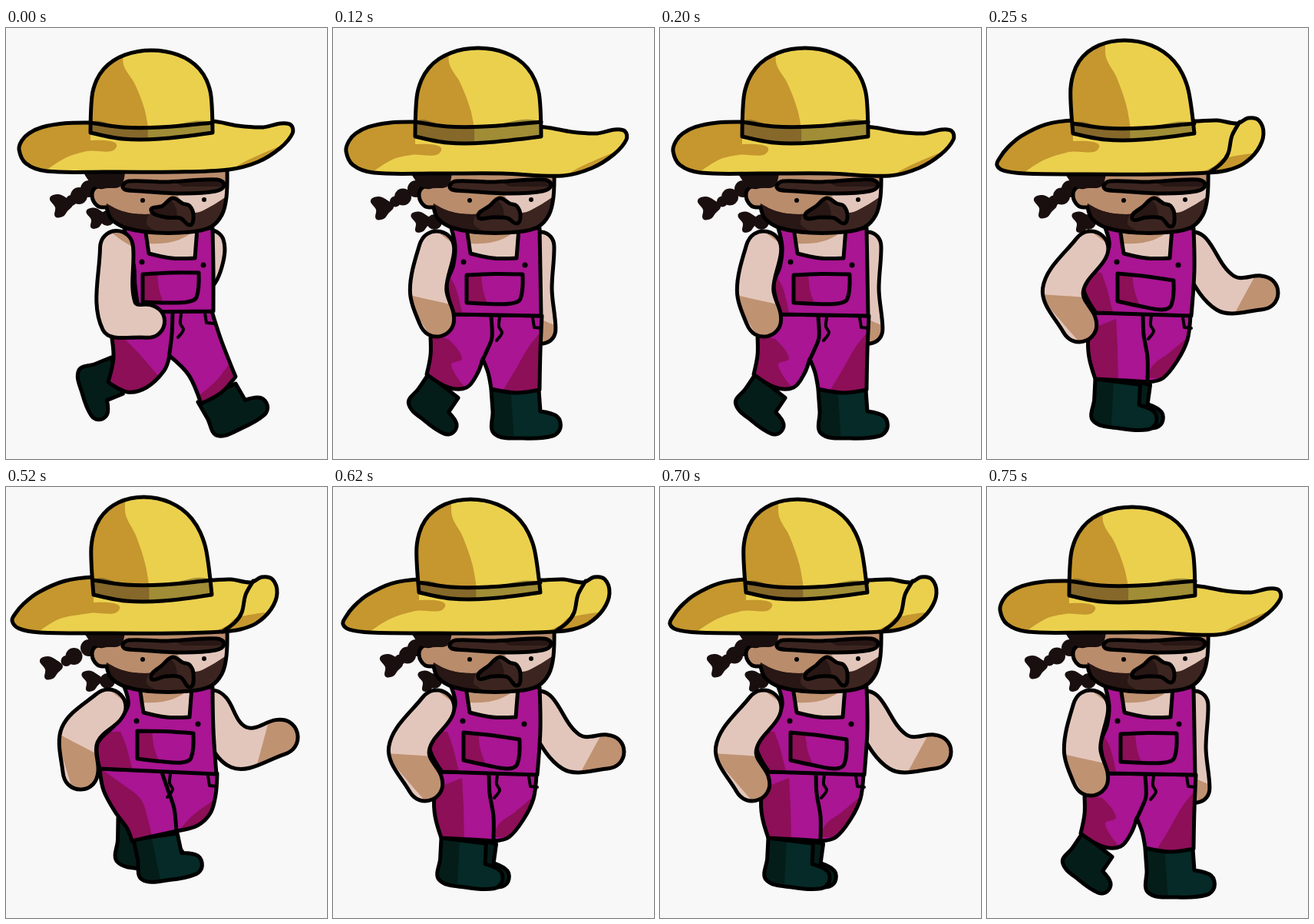
Animation of 418x560 px, one loop 0.87 s. Source, as an HTML page with a canvas:

```html
<!DOCTYPE html>
<html lang="en">
<head>
<meta charset="utf-8">
<title>Walking farmer</title>
<style>
html, body { margin: 0; width: 100%; height: 100%; overflow: hidden; background: #f8f8f8; }
canvas { display: block; width: 100vw; height: 100vh; }
</style>
</head>
<body>
<canvas id="stage" width="418" height="560"></canvas>
<script>
const ctx = document.getElementById('stage').getContext('2d');
const YELLOW = '#ebd04e', OCHRE = '#c5972e', BAND = '#a08d36', BAND_DARK = '#86682a';
const SKIN = '#e3c6bb', TAN = '#bf9272', FACE = '#b98c6c';
const PINK = '#a91592', WINE = '#8c0f58', BOOT = '#052a27', BOOT_DARK = '#041d19';
const BROWN = '#3c2520', DARK = '#281714', HAIR = '#1a0f0f';

// "x y, x y!" to [x, y, corner]; a trailing ! marks a corner.
const points = (text, dx = 0, dy = 0) => text.split(',').map(s => {
  const [x, y] = s.replace('!', '').trim().split(' ').map(Number);
  return [x + dx, y + dy, s.includes('!')];
});

// Smooth path through the points.
function curve(pts, closed) {
  if (typeof pts === 'string') pts = points(pts);
  const n = pts.length, path = new Path2D();
  const at = i => closed ? pts[(i + n) % n] : pts[Math.max(0, Math.min(n - 1, i))];
  const handle = (i, len) => {
    const [x, y, corner] = at(i), [ax, ay] = at(i - 1), [bx, by] = at(i + 1);
    const k = corner ? 0 : len / (Math.hypot(bx - ax, by - ay) || 1);
    return [x + (bx - ax) * k, y + (by - ay) * k];
  };
  path.moveTo(pts[0][0], pts[0][1]);
  for (let i = 0; i < (closed ? n : n - 1); i++) {
    const [x, y] = at(i), [qx, qy] = at(i + 1), len = Math.hypot(qx - x, qy - y) / 3;
    path.bezierCurveTo(...handle(i, len), ...handle(i + 1, -len), qx, qy);
  }
  if (closed) path.closePath();
  return path;
}

function ink(path, width = 5) {
  const m = ctx.getTransform();
  ctx.lineWidth = width / Math.hypot(m.a, m.b);
  ctx.strokeStyle = '#000';
  ctx.stroke(path);
}

function blob(color, pts) {
  ctx.fillStyle = color;
  ctx.fill(curve(pts, true));
}

const line = (pts, width) => ink(curve(pts, false), width);

// Outlined shape; shades are [colour, points] pairs kept inside it.
function part(color, pts, ...shades) {
  const path = curve(pts, true);
  ctx.fillStyle = color;
  ctx.fill(path);
  ctx.save();
  ctx.clip(path);
  shades.forEach(s => blob(...s));
  ctx.restore();
  ink(path);
}

function dot(x, y, r = 3, color = '#000') {
  ctx.fillStyle = color;
  ctx.beginPath();
  ctx.arc(x, y, r, 0, Math.PI * 2);
  ctx.fill();
}

function place(x, y, degrees, scale, paint) {
  ctx.save();
  ctx.translate(x, y);
  ctx.rotate(degrees * Math.PI / 180);
  ctx.scale(scale, scale);
  paint();
  ctx.restore();
}

function braids([x, y], [x2, y2]) {
  const tuft = () => blob(HAIR, '-15 -10, -4 -15, 7 -10, 15 -2, 8 7, 2 14, -8 14, -8 2');
  place(x, y, 0, 1, tuft);
  dot((x + 108) / 2 - 5, (y + 209) / 2 + 4, 7, HAIR);
  dot((x + 108) / 2 + 5, (y + 209) / 2 - 2, 11, HAIR);
  dot(108, 209, 11, HAIR);
  place(x2, y2, 0, .9, tuft);
  dot(132, y2, 10, HAIR);
}

// Round-ended arm along shoulder, elbow, hand; the part past `tan` is shaded.
function arm({ at: [s, e, h], width, tan }) {
  const r = width / 2;
  const a = Math.atan2(e[1] - s[1], e[0] - s[0]), b = Math.atan2(h[1] - e[1], h[0] - e[0]);
  const off = (p, angle, d) => [p[0] + Math.cos(angle) * d, p[1] + Math.sin(angle) * d];
  const cap = (p, dir) => [-90, -45, 0, 45, 90].map(t => off(p, dir + t * Math.PI / 180, r));
  const mid = (a + b) / 2, miter = r / Math.cos((b - a) / 2);
  const cut = [e[0] + (h[0] - e[0]) * tan, e[1] + (h[1] - e[1]) * tan];
  const hand = [off(cut, b - 1.2, 40), off(cut, b, 90), off(cut, b + 2.2, 40)].map(p => [...p, true]);
  part(SKIN, [
    ...cap(s, a + Math.PI), off(e, mid - Math.PI / 2, miter),
    ...cap(h, b), off(e, mid + Math.PI / 2, miter)
  ], [TAN, hand], [TAN, '125 255!, 160 255!, 166 285!, 148 274']);
}

function boot([x, y, turn, scale, lit]) {
  place(x, y, turn, scale, () => part(BOOT_DARK,
    '0 0!, 2 28, 4 57, 42 63, 80 60, 90 50, 86 35, 64 28!, 62 0!',
    [lit ? BOOT : BOOT_DARK, '25 -5!, 70 -5!, 66 28, 95 35!, 78 65!, 30 65!']));
}

function trousers({ shape, shades, seam, waist }) {
  part(PINK, shape, ...shades.map(s => [WINE, s]));
  line(seam);
  const [x, y] = points(seam)[0];
  line([[x + 11, y + 2], [x + 10, y + 14], [x + 14, y + 22], [x + 7, y + 32]], 4);
  const [, , right, top] = waist;
  line([[right - 11, top + 2], [right - 9, top + 15, true], [right, top + 16]], 4);
}

function bib({ waist: [x1, y1, x2, y2], side, neck, pocket: [px, py, tilt] }) {
  part(PINK, [
    [154, 260, true], [159, 284], [(side + 165) / 2, 309], [side, 334],
    [x1, y1, true], [x2, y2, true], [270, 315], [269, 260, true]
  ], [WINE, [[side - 8, 318, true], [149, 318, true], [px - 14, 338], [px - 5, 374, true], [side - 8, 374, true]]]);
  part(SKIN, points('0 260!, 5 293!, 34 299, 65 299!, 68 260!', neck),
    [TAN, points('-5 255!, 70 255!, 55 270, 30 279, -2 280!', neck)]);
  place(px, py, 0, 1, () => part(PINK,
    [[0, 0, true], [36, tilt / 2 - 1], [73, tilt, true], [70, tilt + 32], [58, tilt + 38], [30, tilt / 2 + 38], [0, 36, true]],
    [WINE, '-5 -5!, 19 -2!, 22 22, 30 44!, -5 44!']));
  dot(neck - 4, 304, 3.5);
  dot(neck + 76, 308, 3.5);
}

function head(left, tip) {
  part(FACE, '150 183!, 128 206, 117 207, 112 218, 119 231, 131 233!, 137 248, 157 260, 196 266, 240 265, 266 259, 281 243, 287 220, 288 183!',
    [SKIN, '222 215!, 248 215, 292 205!, 292 245!, 240 245!'],
    [BROWN, '131 228!, 146 236, 165 241, 190 241, 215 230, 245 240, 268 231, 292 215!, 292 275!, 126 275!'],
    [DARK, '131 228!, 146 236, 165 241, 186 242!, 184 256, 212 270!, 126 275!']);
  blob(HAIR, '100 186!, 155 186!, 150 205, 134 208, 115 206');
  dot(178, 224);
  dot(258, 223);
  part(BROWN, '152 205, 160 199, 206 200, 275 197, 284 204, 273 212, 230 215, 176 212, 155 210',
    [DARK, '200 190!, 290 190!, 290 206!, 230 206!']);
  part(BROWN, [[189, left], ...points('204 231, 217 221, 230 228, 239 231, 244 243'), [240, tip], [227, 247], [208, 246]],
    [DARK, '186 240!, 210 222, 222 246, 200 252!']);
}

const EDGE = {
  flat: {
    rim: '268 121, 302 127, 335 129, 358 124, 371 126, 373 137, 357 156, 328 174, 290 184',
    shade: '285 190!, 312 173, 370 148!, 350 195!'
  },
  curled: {
    rim: '270 121, 300 120, 326 124, 340 117, 354 120, 360 138, 352 159, 333 177, 312 185, 288 188',
    shade: '262 195!, 295 180, 307 170, 345 163!, 320 195!',
    fold: '329 122, 319 140, 314 163, 305 176, 289 188'
  }
};

function hat({ left, right, base, top, lean, band, floor, tip: [tx, ty], edge: [kind, dx, dy] }) {
  const join = base - band - 4 * lean, steps = 14;
  const { rim, shade, fold } = EDGE[kind];
  const arc = [0, .04, .14, .32, .64, 1].map(u =>
    [tx + (left - tx) * u, ty - (ty - join) * (1 - (1 - u) ** (3 - lean)) ** (.5 + .2 * lean)]);
  part(YELLOW, [
    ...arc, [190, join], ...points(rim, dx, dy),
    [220, floor], [130, floor], [tx + 36, floor - 1], [tx + 9, ty + (floor - ty) * .62]
  ],
    [OCHRE, [[tx - 9, join - 9, true], [left, join - 9, true], [left, base + 10, true], [left + 34, base + 18],
      [left - 5, base + 24], [tx + 60, floor - 18], [tx + 28, floor + 3, true], [tx - 9, floor + 3, true]]],
    [OCHRE, points(shade, dx, dy)]);
  if (fold) line(points(fold, dx, dy));

  const at = (u, v, corner) => [left + (right - left) * u, base - (base - top) * v, corner];
  const dome = Array.from({ length: steps + 1 }, (_, i) => {
    const a = Math.PI * i / steps, v = Math.max(0, Math.sin(a)) ** .54;
    return at(.5 - .5 * Math.cos(a) - .075 * lean * v, v, i % steps === 0);
  });
  const sag = (y, depth) => [[left, y], [left + 42, y + depth], [left + 90, y + depth], [right, y]];
  const under = [[right + 5, base + 20, true], [left - 5, base + 20, true]];
  part(YELLOW, [...dome, ...sag(base, 8).slice(1, 3).reverse()],
    [OCHRE, [at(-.1, 1.1, true), at(.28, 1.1, true), at(.27, .83), at(.36, .6), at(.44, .3), at(.48, 0, true), at(-.1, 0, true)]],
    [BAND, [...sag(base - band, 6), ...under]],
    [BAND_DARK, [...sag(base - band, 6).slice(0, 2), at(.47, band / (base - top) - .05, true), at(.47, -.2, true), under[1]]]);
  line(sag(base - band, 6));
}

const stride = {
  braids: [[72, 231], [118, 247]],
  near: { at: [[144, 285], [147, 374], [185, 381]], width: 43, tan: 2 },
  far: { at: [[264, 283], [262, 300], [255, 320]], width: 42, tan: 2 },
  boots: [[137, 428, 72, .8, false], [250, 486, -26, .88, false]],
  trousers: {
    shape: '172 368!, 268 368!, 280 405, 299 453!, 280 474, 254 488!, 238 451, 213 426!, 206 445, 183 467, 158 473, 133 460!, 140 428, 136 392!',
    shades: ['130 385!, 150 400, 175 425, 199 453!, 160 480!, 125 470!', '248 480!, 275 457, 295 430!, 310 460!, 254 495!'],
    seam: '217 370, 216 397, 212 430'
  },
  bib: { waist: [173, 369, 270, 368], side: 168, neck: 181, pocket: [178, 320, -2] },
  face: [237, 256],
  hat: { left: 110, right: 269, base: 136, top: 29, lean: 0, band: 13, floor: 187, tip: [17, 158], edge: ['flat', 0, 0] }
};

const step = {
  braids: [[64, 234], [115, 252]],
  near: { at: [[135, 287], [124, 340], [135, 378]], width: 46, tan: .5 },
  far: { at: [[270, 283], [267, 340], [272, 392]], width: 36, tan: .85 },
  boots: [[124, 450, 38, .8, false], [206, 470, 0, 1, true]],
  trousers: {
    shape: '156 372!, 272 374!, 270 420, 269 470!, 238 474, 206 469!, 202 448, 195 430!, 188 449, 174 467, 150 467, 122 450!, 127 425, 127 402!',
    shades: ['118 395!, 150 404!, 168 429, 154 438, 175 470!, 118 470!', '217 478!, 237 445, 255 414, 275 390!, 275 480!'],
    seam: '206 374, 207 402, 201 418, 194 433'
  },
  bib: { waist: [157, 372, 271, 374], side: 148, neck: 174, pocket: [174, 321, -1] },
  face: [245, 254],
  hat: { left: 107, right: 271, base: 141, top: 26, lean: 0, band: 19, floor: 189, tip: [17, 160], edge: ['flat', 9, 8] }
};

const pass = {
  braids: [[76, 232], [124, 252]],
  near: { at: [[135, 287], [99, 340], [120, 385]], width: 46, tan: .3 },
  far: { at: [[268, 287], [310, 344], [357, 344]], width: 44, tan: .7 },
  boots: [[158, 452, 12, .9, false], [141, 456, 7, .95, true]],
  trousers: {
    shape: '140 370!, 204 371!, 265 373!, 261 405, 248 432, 229 455, 209 460!, 180 458, 141 456!, 133 428, 132 403',
    shades: ['125 395!, 168 378!, 170 415, 171 463!, 125 463!', '207 455!, 217 437, 236 423, 260 403!, 250 455!'],
    seam: '203 372, 204 398, 209 428, 209 460'
  },
  bib: { waist: [142, 370, 266, 374], side: 125, neck: 173, pocket: [170, 319, 9] },
  face: [247, 258],
  hat: { left: 112, right: 270, base: 137, top: 16, lean: 1, band: 13, floor: 190, tip: [13, 178], edge: ['curled', 0, 0] }
};

const lift = {
  braids: [[59, 235], [112, 252]],
  near: { at: [[133, 286], [96, 322], [97, 370]], width: 46, tan: .4 },
  far: { at: [[268, 287], [303, 338], [357, 325]], width: 46, tan: .7 },
  boots: [[146, 430, 5, 1, false], [166, 458, -8, .93, true]],
  trousers: {
    shape: '122 366!, 275 372!, 273 400, 266 424, 249 440, 222 447!, 190 454, 164 460!, 158 444, 142 422, 127 394',
    shades: ['115 365!, 126 368!, 150 385, 175 405, 185 432, 192 465!, 140 465!', '222 450!, 244 426, 275 404!, 270 440!'],
    seam: '203 371, 211 394, 219 418, 222 447'
  },
  bib: { waist: [122, 366, 274, 373], side: 119, neck: 174, pocket: [171, 317, 3] },
  face: [248, 260],
  hat: { left: 114, right: 268, base: 140, top: 13, lean: 1, band: 19, floor: 190, tip: [8, 174], edge: ['curled', -7, 0] }
};

function farmer(pose) {
  const { waist } = pose.bib;
  braids(...pose.braids);
  arm(pose.far);
  pose.boots.forEach(boot);
  trousers({ ...pose.trousers, waist });
  bib(pose.bib);
  arm(pose.near);
  head(...pose.face);
  hat(pose.hat);
}

const LOOP = 870;
const SCHEDULE = [[120, stride], [250, step], [370, pass], [620, lift], [750, pass], [LOOP, step]];

function draw() {
  const t = performance.now() % LOOP;
  ctx.fillStyle = '#f8f8f8';
  ctx.fillRect(0, 0, 418, 560);
  ctx.lineJoin = ctx.lineCap = 'round';
  farmer(SCHEDULE.find(([end]) => t < end)[1]);
  requestAnimationFrame(draw);
}
draw();
</script>
</body>
</html>
```
